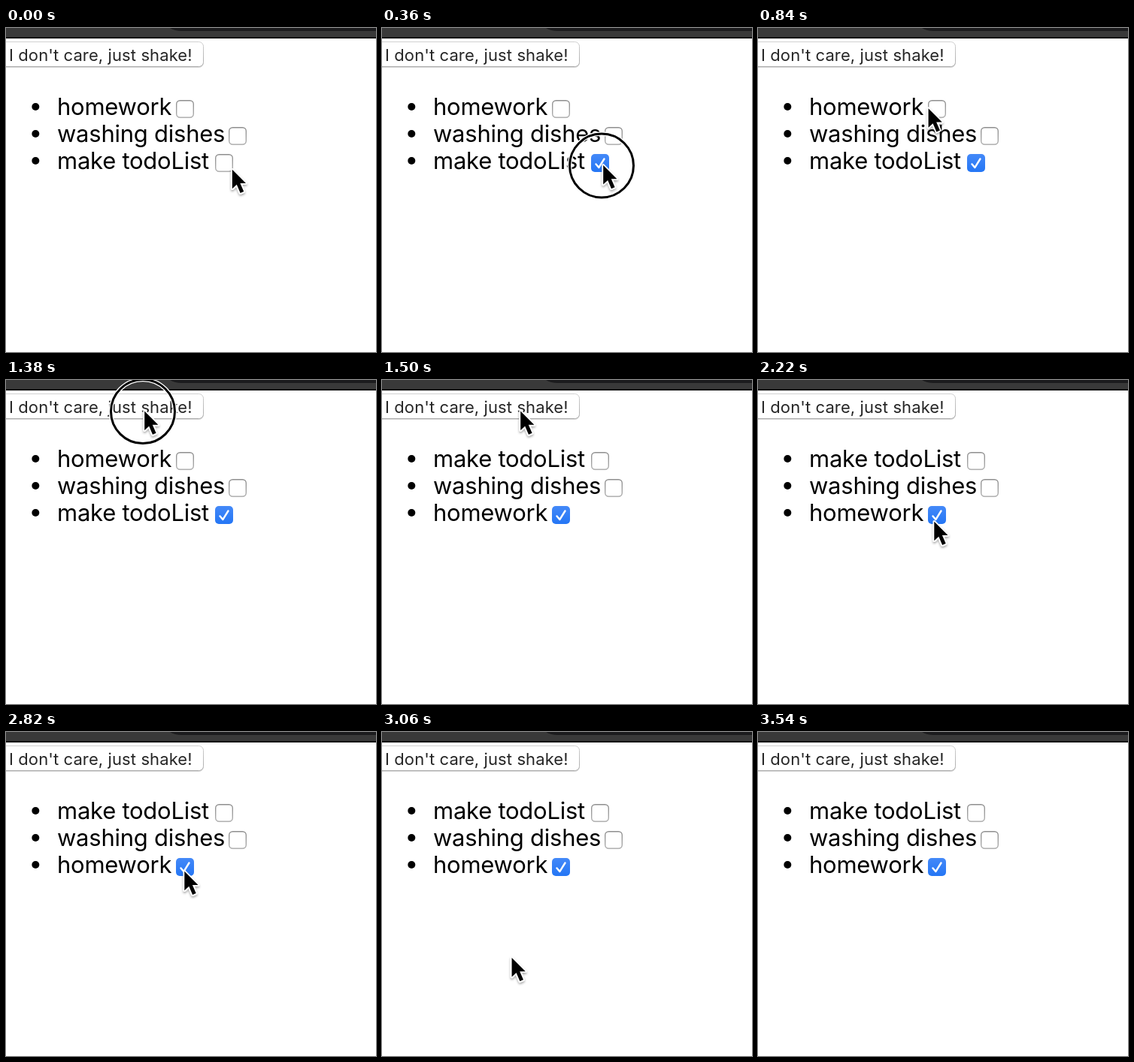
Write an HTML page that moves like this. It is 492 by 432 pixels and loops after 3.6 s.

```html
<!DOCTYPE html>
<html lang="en">
<head>
<meta charset="utf-8">
<title>Todo list shuffle</title>
<style>
  html, body { margin: 0; width: 100%; height: 100%; overflow: hidden; background: #fff; }
  svg { display: block; width: 492px; height: 432px; }
  text { font-family: Inter, "Open Sans", sans-serif; }
  .label { font-size: 22px; letter-spacing: .1px; fill: #262626; }
  .item { font-size: 31px; letter-spacing: -.25px; fill: #000; }
</style>
</head>
<body>
<svg viewBox="0 0 492 432" xmlns="http://www.w3.org/2000/svg">
  <defs>
    <linearGradient id="edge" x1="0" y1="0" x2="0" y2="1">
      <stop offset="0" stop-color="#d0d0d0"/>
      <stop offset="1" stop-color="#aaa"/>
    </linearGradient>
    <linearGradient id="boxEdge" x1="0" y1="0" x2="0" y2="1">
      <stop offset="0" stop-color="#8e8e8e"/>
      <stop offset="1" stop-color="#b0b0b0"/>
    </linearGradient>
    <linearGradient id="blue" x1="0" y1="0" x2="0" y2="1">
      <stop offset="0" stop-color="#4489f8"/>
      <stop offset="1" stop-color="#2476f5"/>
    </linearGradient>
    <filter id="shade" x="-50%" y="-50%" width="200%" height="200%">
      <feDropShadow dx="0" dy="2" stdDeviation="1.6" flood-color="#000" flood-opacity=".35"/>
    </filter>
  </defs>

  <rect width="492" height="432" fill="#fff"/>
  <rect width="492" height="14" fill="#393939"/>
  <path d="M218 0Q224 4 234 4H492V0Z" fill="#1b1b1d"/>
  <rect y="12" width="492" height="2" fill="#111"/>

  <rect x="-12" y="19" width="275" height="34" rx="6.5" fill="#000" opacity=".15"/>
  <rect x="-12" y="18.5" width="274.5" height="33" rx="6" fill="#fff" stroke="url(#edge)"/>
  <text class="label" x="4" y="44.3">I don't care, just shake!</text>

  <g id="list"></g>

  <g id="ring" fill="none">
    <circle r="42.5" stroke="#fff" stroke-width="5.5"/>
    <circle r="42.5" stroke="#000" stroke-width="3"/>
  </g>
  <g id="cursor" filter="url(#shade)">
    <path d="M0 0V25.5L6 20L10.8 31.2L15.4 29.2L10.6 18.2H18.2Z"
      fill="#000" stroke="#fff" stroke-width="3.6" stroke-linejoin="round" paint-order="stroke"/>
  </g>
</svg>
<script>
const LOOP = 3600, STEP = 60;
const $ = id => document.getElementById(id);

// Checkbox x for each task
const boxX = { 'homework': 226, 'washing dishes': 296, 'make todoList': 278 };
const before = Object.keys(boxX);
const after = [...before].reverse();

const linear = k => k;
const easeOut = k => 1 - (1 - k) ** 2;
const easeInOut = k => k * k * (3 - 2 * k);

// Pointer stops, and the curved moves between them
const rest = [300.8, 188.8], todoBox = [294.2, 183], button = [184.2, 41.6];
const doneBox = [234.3, 188.8], hover = [237.3, 185.8], away = [80, 450];
const moves = [
  { start: 0, end: 120, from: rest, bend: [297, 185], to: todoBox, ease: linear },
  { start: 600, end: 1320, from: todoBox, bend: [226, 118], to: button, ease: easeOut },
  { start: 1740, end: 2220, from: button, bend: [-58, 200], to: doneBox, ease: easeInOut },
  { start: 2280, end: 2640, from: doneBox, bend: [231, 156], to: hover, ease: easeInOut },
  { start: 2820, end: 3240, from: hover, bend: [210, 245], to: away, ease: linear }
];
const presses = [[180, 420], [1320, 1500]];
const CHECKED = 360, SHUFFLED = 1500;

function pointerAt(t) {
  const { start, end, from, bend, to, ease } = moves.filter(m => m.start <= t).pop();
  const k = ease(Math.min(1, (t - start) / (end - start))), j = 1 - k;
  return from.map((a, i) => j * j * a + 2 * j * k * bend[i] + k * k * to[i]);
}

function checkbox(x, y, on) {
  if (!on) return `<rect x="${x + .7}" y="${y + 1.2}" width="22.6" height="23" rx="5" fill="#000" opacity=".1"/>
    <rect x="${x + .7}" y="${y + .7}" width="22.6" height="22.6" rx="4.8" fill="#fff" stroke="url(#boxEdge)" stroke-width="1.4"/>`;
  return `<rect x="${x}" y="${y}" width="24" height="24" rx="5" fill="url(#blue)"/>
    <path d="M${x + 6.5} ${y + 13.5}l3.8 4.6l7.2 -11.6" fill="none" stroke="#fff" stroke-width="2.4" stroke-linecap="round" stroke-linejoin="round"/>`;
}

function drawList(names, done) {
  $('list').innerHTML = names.map((name, i) => {
    const y = 36 * i;
    return `<circle cx="39.3" cy="${y + 105}" r="5"/>
      <text class="item" x="68" y="${y + 116}">${name}</text>
      ${checkbox(boxX[name], y + 96, done && i === 2)}`;
  }).join('');
}

let shown = '';
function render(ms) {
  const t = Math.floor(ms % LOOP / STEP) * STEP;
  const shuffled = t >= SHUFFLED, done = t >= CHECKED;
  const state = `${shuffled} ${done}`;
  if (state !== shown) {
    drawList(shuffled ? after : before, done);
    shown = state;
  }
  const [x, y] = pointerAt(t);
  $('cursor').setAttribute('transform', `translate(${x} ${y})`);
  const pressed = presses.some(([a, b]) => t >= a && t < b);
  $('ring').setAttribute('visibility', pressed ? 'visible' : 'hidden');
  $('ring').setAttribute('transform', `translate(${x - 2.2} ${y + .5})`);
}

const start = performance.now();
function tick() {
  render(performance.now() - start);
  requestAnimationFrame(tick);
}
tick();
</script>
</body>
</html>
```
